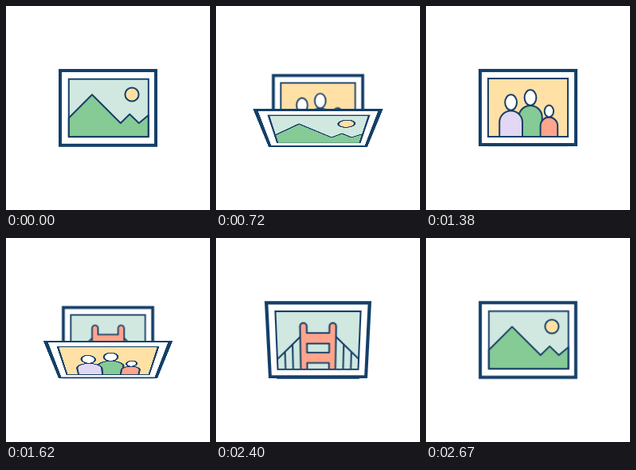
An HTML page that plays this animation: 256x256 px, repeating every 2.7 s.

```html
<!DOCTYPE html>
<html lang="en">
<head>
<meta charset="utf-8">
<title>Picture frames</title>
<style>
  html, body { margin: 0; width: 100%; height: 100%; overflow: hidden; background: #fff; }
  #stage { position: relative; width: 256px; height: 256px; overflow: hidden; perspective: 356px; perspective-origin: 128px 127.5px; }
  .card { position: absolute; left: 0; top: 0; width: 256px; height: 256px; backface-visibility: hidden; }
  .line { stroke: #183f68; stroke-width: 2; stroke-linejoin: round; }
</style>
</head>
<body>
<div id="stage"></div>
<script>
const PERIOD = 900, START = 463, BACK_SCALE = 0.8;

const hills = `
  <path d="M78.8 140.5L108 111.3L143.8 147L155.2 135.8L166.8 147L178.8 137V164.2H78.8Z" fill="#86ca96" class="line"/>
  <circle cx="158" cy="111" r="8.6" fill="#ffe0a3" class="line"/>`;

const person = (x, headY, rx, ry, half, top, fill) => `
  <path d="M${x - half} 164V${top + half}A${half} ${half} 0 0 1 ${x + half} ${top + half}V164Z" fill="${fill}" class="line"/>
  <ellipse cx="${x}" cy="${headY}" rx="${rx}" ry="${ry}" fill="#fff" class="line"/>`;

const family =
  person(131, 115, 7.4, 9.8, 14.7, 125, "#86ca96") +
  person(106.6, 121, 7.4, 9.8, 14.4, 131.5, "#e2d8f3") +
  person(154.4, 132, 5.7, 7.4, 10.8, 139.5, "#ffa58c");

const cable = side => {
  const x = d => 128.2 + side * d;
  return `<path d="M${x(21.5)} 122L${x(49.5)} 150M${x(31)} 131.5V164M${x(40.5)} 141V164" fill="none" class="line"/>`;
};

const bridge = cable(-1) + cable(1) + `
  <path fill-rule="evenodd" fill="#ffa58c" class="line" d="M106.6 164V109A4 4 0 0 1 114.6 109V117.3H141.6V109A4 4 0 0 1 149.6 109V164H141.6V155.6H114.6V164ZM114.6 130.5H141.6V142H114.6Z"/>`;

// x, y: corner of the inner opening; bottom: outer edge the card tips over
const card = (sky, art, x, y, bottom) => {
  const opening = `x="${x}" y="${y}" width="100" height="${164 - y}"`;
  return `
  <svg class="card" viewBox="0 0 256 256" style="transform-origin:128px ${bottom}px">
    <rect x="68" y="81" width="120" height="${bottom - 83}" fill="#fff" stroke="#143f69" stroke-width="4"/>
    <rect ${opening} fill="${sky}"/>
    ${art}
    <rect ${opening} fill="none" class="line" style="stroke-linejoin:miter"/>
  </svg>`;
};

const stage = document.getElementById("stage");
stage.innerHTML =
  card("#d0e8e0", hills, 78.8, 91.7, 176.8) +
  card("#ffe0a5", family, 78, 91, 176) +
  card("#d0e8e0", bridge, 78, 91, 176);
const cards = [...stage.children];

// Symmetric ease, cubic-bezier(.5, 0, .5, 1)
function ease(x) {
  if (x <= 0) return 0;
  if (x >= 1) return 1;
  let lo = 0, hi = 1;
  for (let i = 0; i < 24; i++) {
    const u = (lo + hi) / 2;
    if (1.5 * u * (1 - u) + u ** 3 < x) lo = u; else hi = u;
  }
  return lo * lo * (3 - 2 * lo);
}

function draw(time) {
  const t = time % (PERIOD * cards.length);
  const front = Math.floor(t / PERIOD);
  const next = (front + 1) % cards.length;
  const p = ease((t % PERIOD - START) / (PERIOD - START));
  cards.forEach((el, i) => {
    const shown = i === front || (i === next && p > 0);
    el.style.visibility = shown ? "visible" : "hidden";
    el.style.zIndex = i === front ? 2 : 1;
    if (i === front) el.style.transform = p > 0 ? `rotateX(${-90 * p}deg)` : "none";
    else el.style.transform = `scale(${BACK_SCALE + (1 - BACK_SCALE) * p})`;
  });
}

function tick() {
  draw(performance.now());
  requestAnimationFrame(tick);
}
tick();
</script>
</body>
</html>
```
